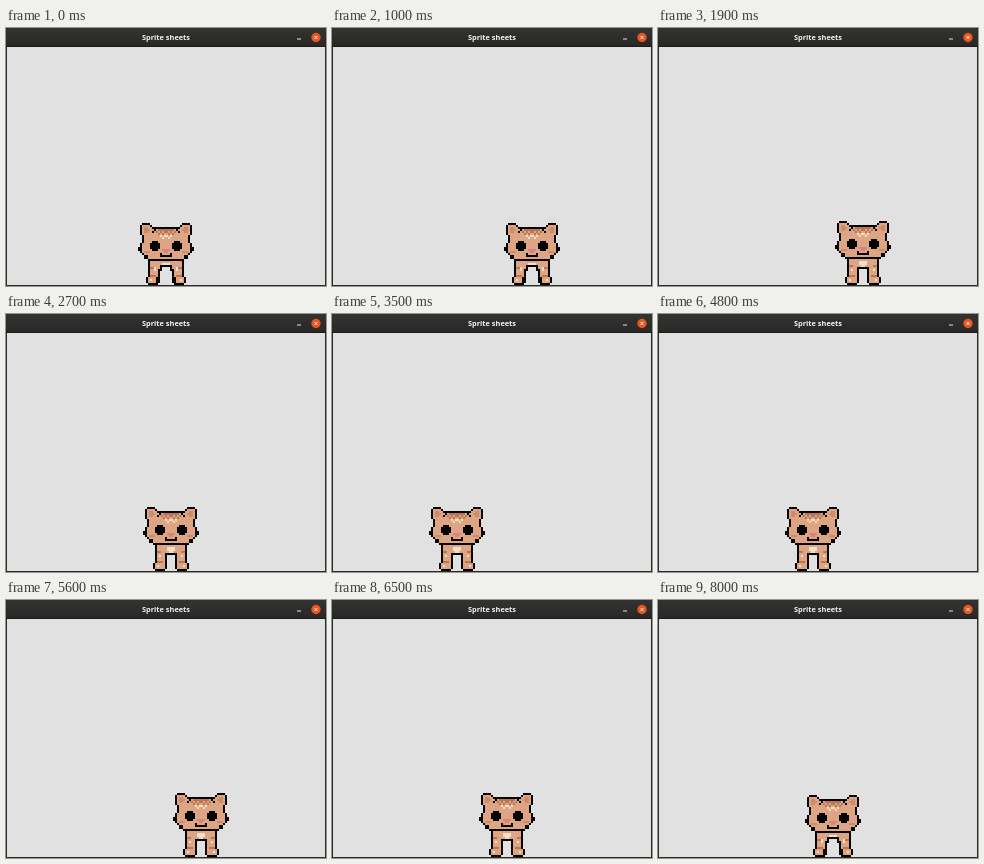
An HTML page for the animation above (8100 ms loop, 320 by 258 pixels).

```html
<!DOCTYPE html>
<html lang="en">
<head>
<meta charset="utf-8">
<title>Sprite sheets</title>
<style>
  html, body { margin: 0; width: 100%; height: 100%; overflow: hidden; background: #e1e1e1; }
  svg { display: block; width: 100vw; height: 100vh; }
  .title { font: bold 7.4px "Open Sans", "Noto Sans", sans-serif; fill: #f4f4f2; text-anchor: middle; }
  #cat { shape-rendering: crispEdges; }
  .ink { fill: #050404; }
  .fur { fill: #dda583; }
  .stripe { fill: #b9774f; }
  .tan { fill: #cb8d68; }
  .cream { fill: #f3ddcb; }
  .pink { fill: #d9837b; }
</style>
</head>
<body>
<svg viewBox="0 0 320 258">
  <defs>
    <linearGradient id="bar" x2="0" y2="1">
      <stop stop-color="#343332"/>
      <stop offset="1" stop-color="#282827"/>
    </linearGradient>

    <!-- Left halves of the sprite; each is mirrored about x = 14 -->
    <g id="head">
      <path class="ink" d="M14 2H7V1H6V0H2V1H1V6H2V10H1V12H0V14H1V15H2V16H3V18H5V19H14Z"/>
      <path class="fur" d="M14 3H7V2H6V1H2V6H3V10H2V15H3V16H5V18H14Z"/>
      <path class="tan" d="M3 2h2v1h1v1h-1v1h-2z M3 14h3v1h-3z"/>
      <path class="stripe" d="M10 3h4v1h-4z M9 4h1v1h-1z M11 4h1v1h-1z M13 4h1v1h-1z M10 5h1v1h-1z M12 5h1v1h-1z"/>
      <path class="cream" d="M11 6h1v1h-1z M13 6h1v1h-1z M12 7h1v1h-1z"/>
      <path class="ink" d="M8 3h1v1h-1v1h-1v-1h1z M7 9h3v1h1v3h-1v1h-3v-1h-1v-3h1z M11 15h1v1h2v1h-3z"/>
      <path class="pink" d="M12 13h2v2h-1v-1h-1z"/>
    </g>
    <g id="stand">
      <path class="ink" d="M14 18H6V28H5V31H6V32H11V31H12V24H14Z"/>
      <path class="fur" d="M14 19H7V28H6V31H11V23H14Z"/>
      <path class="stripe" d="M7 22h2v1h-2z M7 27h3v1h-3z"/>
      <path class="cream" d="M12 20h2v3h-1v-1h-1z M8 24h1v1h-1z M7 29h1v1h-1z"/>
    </g>
    <g id="crouch">
      <path class="ink" d="M14 19H5V28H4V31H5V32H10V31H11V25H12V23H14Z"/>
      <path class="fur" d="M14 20H6V28H5V31H9V28H10V24H11V22H14Z"/>
      <path class="stripe" d="M6 23h2v1h-2z M6 27h3v1h-3z"/>
      <path class="cream" d="M12 21h2v1h-2z M8 23h1v2h-1z M6 29h1v1h-1z"/>
    </g>
  </defs>

  <rect width="320" height="258" fill="#2b2b2a"/>
  <rect width="320" height="18" fill="url(#bar)"/>
  <rect y="18" width="320" height="1" fill="#191919"/>
  <rect x="1" y="19" width="318" height="238" fill="#e1e1e1"/>
  <text class="title" x="160" y="12.4">Sprite sheets</text>
  <path d="M291 11h4" stroke="#e4e4e2"/>
  <circle cx="310" cy="9.5" r="4.7" fill="#e95420"/>
  <path d="M308.4 7.9l3.2 3.2m0-3.2l-3.2 3.2" stroke="#fff" stroke-width=".9"/>

  <g id="cat">
    <g id="legsUp"><use href="#stand"/><use href="#stand" transform="matrix(-1 0 0 1 28 0)"/></g>
    <g id="legsDown"><use href="#crouch"/><use href="#crouch" transform="matrix(-1 0 0 1 28 0)"/></g>
    <g id="face"><use href="#head"/><use href="#head" transform="matrix(-1 0 0 1 28 0)"/></g>
  </g>
</svg>
<script>
  const LOOP = 8100, TICK = 100;
  const STOP_TICK = 64, IDLE_TICKS = 5;
  // [tick, steps from the starting place]
  const route = [[2, 0], [15, 13], [38, -10], [39, -10], [58, 9], [64, 3], [81, 3]];
  const el = id => document.getElementById(id);
  const cat = el("cat"), face = el("face"), legsUp = el("legsUp"), legsDown = el("legsDown");

  function stepsAt(tick) {
    const i = route.findIndex(([end]) => tick <= end);
    if (i < 1) return 0;
    const [t0, s0] = route[i - 1], [t1, s1] = route[i];
    return s0 + (s1 - s0) * (tick - t0) / (t1 - t0);
  }

  function isUp(tick) {
    if (tick < STOP_TICK) {
      const paused = tick > 38 ? 1 : 0;
      return (tick - paused) % 2 === 1;
    }
    return Math.floor((tick - STOP_TICK - 1) / IDLE_TICKS) % 2 === 0;
  }

  function draw(now) {
    const tick = Math.max(2, Math.floor(now % LOOP / TICK));
    const x = Math.round(131.85 + 5.04 * stepsAt(tick));
    const up = isUp(tick);
    cat.setAttribute("transform", `translate(${x} 193) scale(2)`);
    face.setAttribute("transform", `translate(0 ${up ? 0 : 1})`);
    legsUp.style.display = up ? "" : "none";
    legsDown.style.display = up ? "none" : "";
  }

  const start = performance.now();
  function loop() {
    draw(performance.now() - start);
    requestAnimationFrame(loop);
  }
  loop();
</script>
</body>
</html>
```
